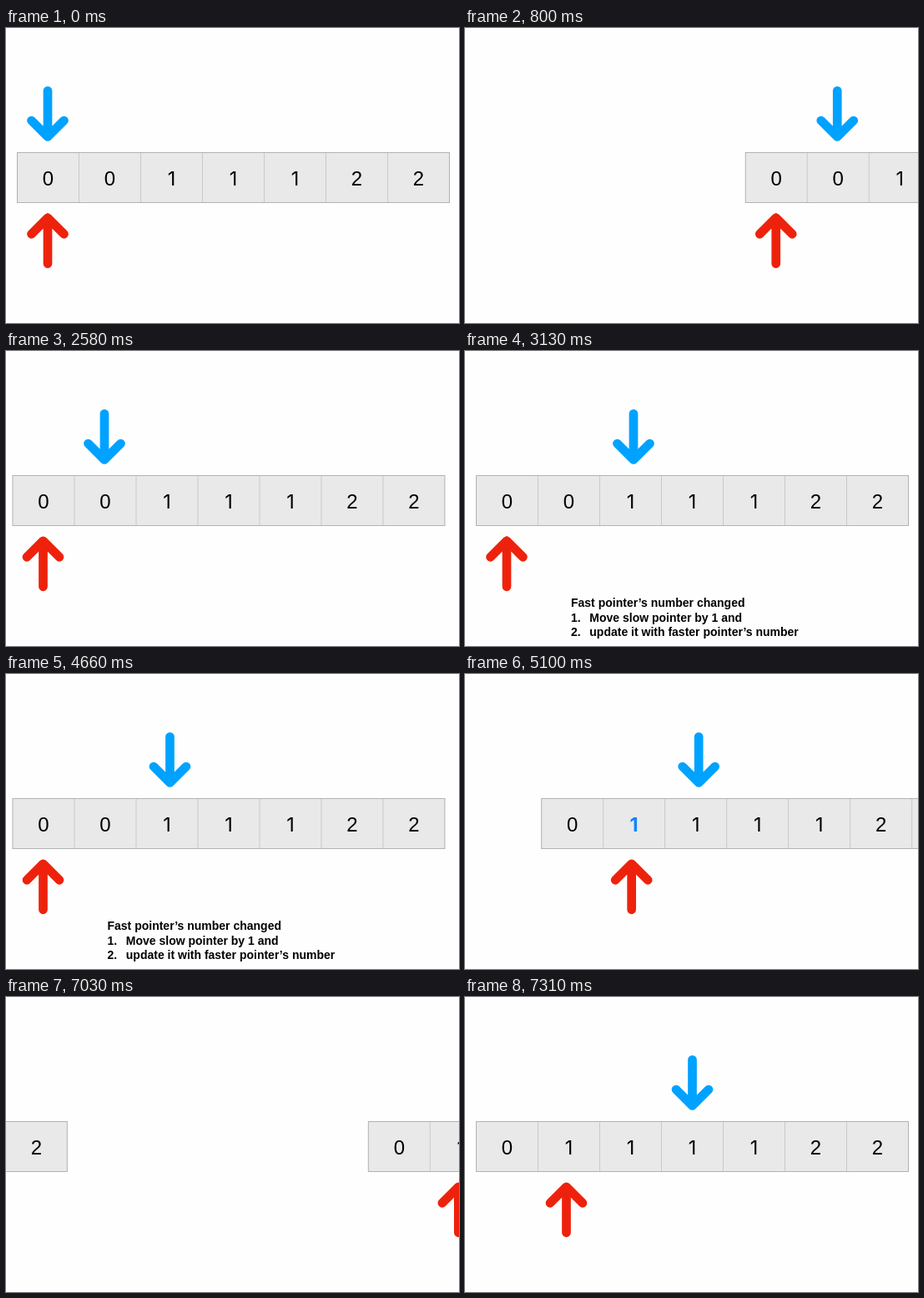
These frames come from a looping animation (543x354 px, 8 s). An HTML page:

```html
<!DOCTYPE html>
<html lang="en">
<head>
<meta charset="utf-8">
<title>Fast and slow pointers</title>
<style>
  html, body { margin: 0; width: 100%; height: 100%; overflow: hidden; background: #fefefe; }
  svg { display: block; width: 100%; height: 100%; }
  text { font-family: "Liberation Sans", Arial, sans-serif; }
  .digit { font-size: 24px; text-anchor: middle; }
  .one { font-family: Inter, "Liberation Sans", sans-serif; font-size: 23.5px; }
  .changed { font-weight: 700; fill: #1485ff; }
  .caption { font-size: 14px; font-weight: 700; }
  .arrow { fill: none; stroke-width: 10.7; stroke-linecap: round; stroke-linejoin: round; }
</style>
</head>
<body>
<svg id="stage" viewBox="0 0 543 354"></svg>
<script>
const LOOP = 8000, STEP = 30;
const PUSH = { lead: 25, length: 555, distance: 879 };
const TABLE = { x: 13.5, y: 149.5, cell: 74, height: 60 };

const slides = [
  { digits: "0011122", fast: 50, slow: 50 },
  { digits: "0011122", fast: 123.5, slow: 50 },
  { digits: "0011122", fast: 202, slow: 50, caption: true },
  { digits: "0111122", fast: 202, slow: 121.5, changed: 1 },
  { digits: "0111122", fast: 272.5, slow: 121.5 }
];

// Each push moves one slide out and the next one in.
const pushes = [
  { at: 500, lead: 25 },
  { at: 2580, lead: 28 },
  { at: 4660, lead: 28, hold: 60 },
  { at: 6750, lead: 15 }
];

const stage = document.getElementById("stage");

function add(parent, tag, attrs, content) {
  const node = document.createElementNS("http://www.w3.org/2000/svg", tag);
  for (const key in attrs) node.setAttribute(key, attrs[key]);
  if (content) node.textContent = content;
  return parent.appendChild(node);
}

function addArrow(parent, x, tail, tip, color) {
  const wing = tip - Math.sign(tip - tail) * 19.5;
  add(parent, "path", {
    class: "arrow", stroke: color,
    d: `M${x} ${tail}V${tip}M${x - 19.5} ${wing}L${x} ${tip}L${x + 19.5} ${wing}`
  });
}

function addTable(parent, { digits, changed }) {
  const { x, y, cell, height } = TABLE;
  const width = cell * digits.length;
  add(parent, "rect", { x, y, width, height, fill: "#e9e9e9" });
  [...digits].forEach((digit, i) => {
    const left = x + i * cell;
    if (i) add(parent, "path", { d: `M${left} ${y}v${height}`, stroke: "#c9c9c9" });
    const name = "digit" + (digit === "1" ? " one" : "") + (i === changed ? " changed" : "");
    add(parent, "text", { class: name, x: left + cell / 2, y: 189 }, digit);
  });
  add(parent, "rect", { x, y, width, height, fill: "none", stroke: "#b2b2b2" });
}

function addCaption(parent) {
  const line = (x, y, words) => add(parent, "text", { class: "caption", x, y }, words);
  line(127, 307, "Fast pointer’s number changed");
  line(127, 324.5, "1.");
  line(149.3, 324.5, "Move slow pointer by 1 and");
  line(127, 342, "2.");
  line(149.3, 342, "update it with faster pointer’s number");
}

const groups = slides.map(slide => {
  const group = add(stage, "g", {});
  addTable(group, slide);
  addArrow(group, slide.fast, 75.3, 130.5, "#00a2ff");
  addArrow(group, slide.slow, 282.8, 227.8, "#ee220c");
  if (slide.caption) addCaption(group);
  return group;
});

function progress(push, time) {
  let elapsed = time - push.at;
  if (elapsed < 0) return 0;
  elapsed = elapsed < (push.hold || 0) ? 0 : Math.floor(elapsed / STEP) * STEP;
  const u = Math.min(1, (elapsed + push.lead) / PUSH.length);
  return (1 - Math.cos(Math.PI * u)) / 2;
}

function render(time) {
  const position = pushes.reduce((sum, push) => sum + progress(push, time), 0);
  groups.forEach((group, i) => {
    const offset = (i - position) * PUSH.distance;
    group.setAttribute("transform", `translate(${offset.toFixed(2)} 0)`);
    group.setAttribute("visibility", Math.abs(offset) < 543 ? "visible" : "hidden");
  });
}

const start = performance.now();
function tick(now) {
  render(Math.max(0, now - start) % LOOP);
  requestAnimationFrame(tick);
}
render(0);
requestAnimationFrame(tick);
</script>
</body>
</html>
```
